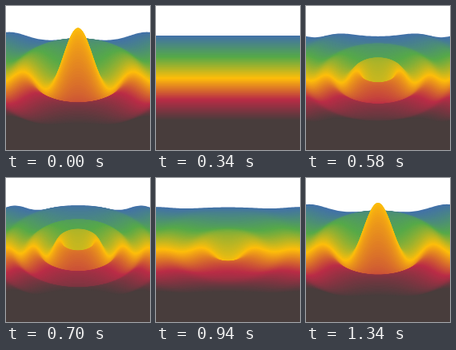
Animation, 180 px wide and 180 px high, one loop 1.36 s. Source, as an HTML page with a canvas:

```html
<!DOCTYPE html>
<html lang="en">
<head>
<meta charset="utf-8">
<title>Radial wave</title>
<style>
  html, body { margin: 0; width: 100%; height: 100%; overflow: hidden; background: #fff; }
  canvas { display: block; width: 100vw; height: 100vh; }
</style>
</head>
<body>
<canvas id="stage" width="180" height="180"></canvas>
<script>
const SIZE = 180, LOOP = 1360, STEP = 20;
const BACK = 37, FRONT = 143, CENTER = 90, TILT = 0.58;
const HEIGHT = 62, ROW_GAP = 0.6, COLUMN_GAP = 2;
const STOPS = [[66, 113, 168], [86, 169, 72], [254, 190, 10], [186, 44, 70], [70, 61, 60]];

const ctx = document.getElementById("stage").getContext("2d");

function depthColor(u) {
  const p = Math.min(u, 0.9999) * (STOPS.length - 1);
  const i = Math.floor(p), f = p - i;
  const mix = STOPS[i].map((c, n) => Math.round(c + (STOPS[i + 1][n] - c) * f));
  return `rgb(${mix})`;
}

const sinc = x => Math.abs(x) < 1e-6 ? 1 : Math.sin(x) / x;

function draw(time) {
  // The swing runs linearly from +1 to -1 and back; the ripples tighten on the way down.
  const fall = 1 - Math.abs(1 - 2 * time / LOOP);
  const height = HEIGHT * (1 - 2 * fall);
  const frequency = 0.112 + 0.091 * fall ** 3;

  ctx.fillStyle = "#fff";
  ctx.fillRect(0, 0, SIZE, SIZE);
  for (let base = BACK; base <= FRONT; base += ROW_GAP) {
    const depth = (base - CENTER) / TILT;
    ctx.beginPath();
    ctx.moveTo(0, SIZE);
    for (let x = 0; x <= SIZE; x += COLUMN_GAP) {
      const radius = Math.hypot(x - SIZE / 2, depth);
      ctx.lineTo(x, base - height * sinc(radius * frequency));
    }
    ctx.lineTo(SIZE, SIZE);
    ctx.fillStyle = depthColor((base - BACK) / (FRONT - BACK));
    ctx.fill();
  }
}

let start = null, shown = -1;
function tick(now) {
  if (start === null) start = now;
  const time = Math.floor(((now - start) % LOOP) / STEP) * STEP;
  if (time !== shown) draw(shown = time);
  requestAnimationFrame(tick);
}
draw(0);
requestAnimationFrame(tick);
</script>
</body>
</html>
```
